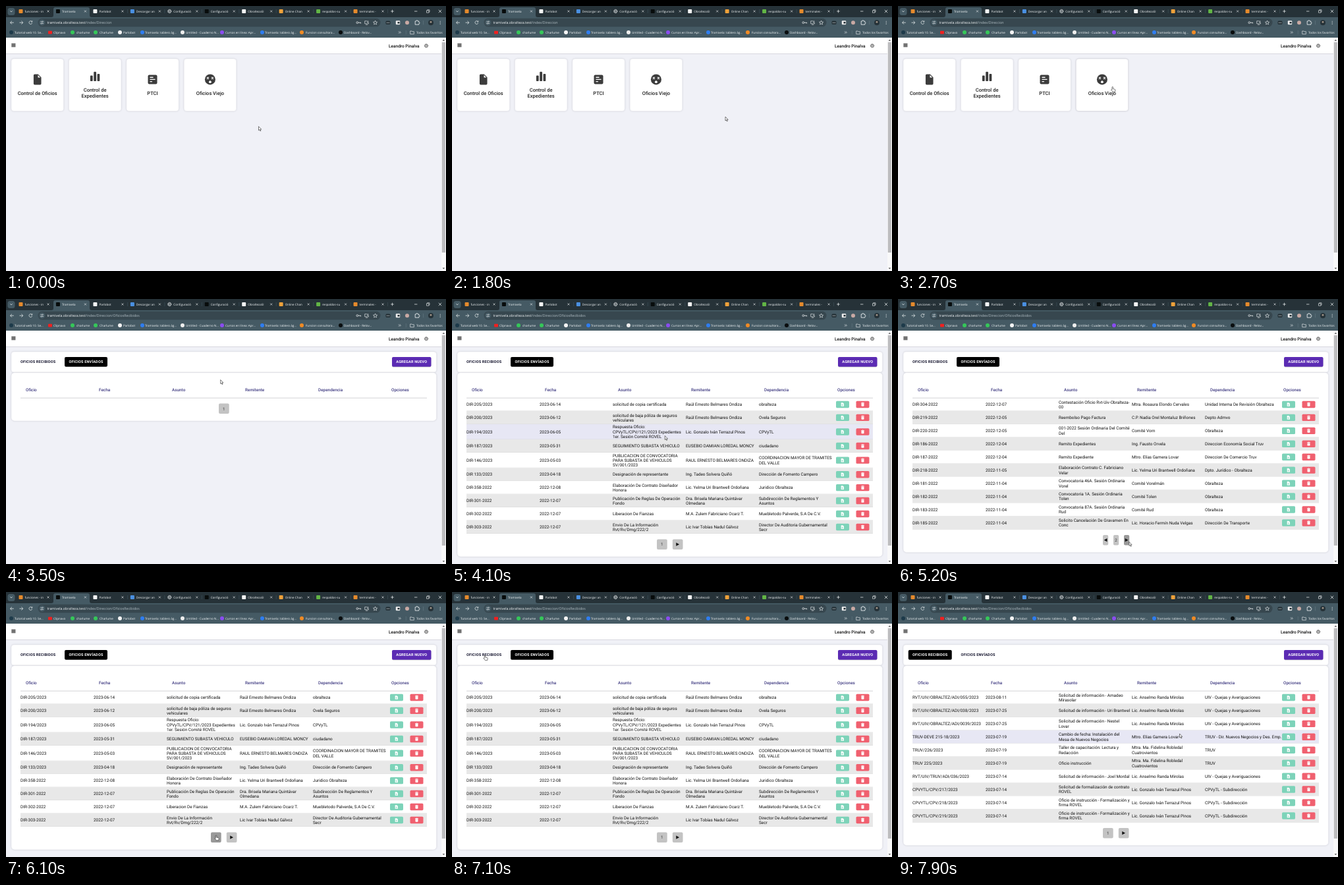
An HTML page that plays this animation: 668x402 px, repeating every 8 s.

```html
<!DOCTYPE html>
<html lang="es">
<head>
<meta charset="utf-8">
<title>Control de oficios</title>
<style>
html, body { margin: 0; width: 100%; height: 100%; overflow: hidden; background: #f0f1f7; }
svg { display: block; width: 668px; height: 402px; text-rendering: geometricPrecision; }
text { font-family: Roboto, sans-serif; white-space: pre; }
#bar text { font-family: "Open Sans", sans-serif; font-weight: 500; }
.card { fill: #fff; stroke: #e2e3ea; stroke-width: .5; filter: drop-shadow(0 .3px .8px #0002); }
.caps { letter-spacing: .16px; }
</style>
</head>
<body>
<svg viewBox="0 0 668 402"><g id="bar"></g><g id="page"></g><g id="view"></g><g id="cursor"></g></svg>
<script>
const $ = id => document.getElementById(id);
const rect = (x, y, w, h, fill, r = 0, more = '') =>
  `<rect x="${x}" y="${y}" width="${w}" height="${h}" rx="${r}" fill="${fill}" ${more}/>`;
const dot = (x, y, r, fill, more = '') => `<circle cx="${x}" cy="${y}" r="${r}" fill="${fill}" ${more}/>`;
const ring = (x, y, r, color, w, more = '') => dot(x, y, r, 'none', `stroke="${color}" stroke-width="${w}" ${more}`);
const shape = (d, fill, more = '') => `<path d="${d}" fill="${fill}" ${more}/>`;
const line = (d, color, w = .7, more = '') =>
  `<path d="${d}" fill="none" stroke="${color}" stroke-width="${w}" ${more}/>`;
// Text centred vertically on y
const text = (x, y, s, size, fill, more = '') =>
  `<text x="${x}" y="${y + size * .355}" font-size="${size}" fill="${fill}" ${more}>${s}</text>`;
const MID = 'text-anchor="middle"', MEDIUM = 'font-weight="500"';
const gear = (x, y, color) => ring(x, y, 2.1, color, .7) +
  ring(x, y, 2.8, color, .7, 'stroke-dasharray="1.1 1.1"') + ring(x, y, .7, color, .5);

// Browser frame
const TABS = [
  ['funciones - in', '#e58a2c'], ['Tramivela', '#080c0c'], ['Parlobot', '#f4f4f4'], ['Descargar an', '#4a90e2'],
  ['Configuració', ''], ['Configuració', '#080c0c'], ['ObraltezaSI', '#f4f4f4'], ['Online Chan', '#efa13a'],
  ['respaldos-su', '#62b545'], ['terminales - ', '#e58a2c']];
const MARKS = [
  [8, 13, 'Tutorial web 10. Se...', '#1d3a4a'], [67, 72, 'Clipnavo', '#f02020'], [101, 107, 'charlume', '#35c759'],
  [136, 142, 'Charlume', '#35c759'], [173, 178, 'Parlobot', '#f4f4f4'], [207, 211, 'Tramivela: tablero ág...', '#2f7df0'],
  [268, 273, 'Untitled - Cuaderno N...', '#eee'], [328, 333, 'Cursos en línea: Apr...', '#8a4cf0'],
  [389, 393, 'Tramivela: tablero ág...', '#2f7df0'], [449, 455, 'Funcion consultora...', '#f08a24'],
  [508, 513, 'Dashboard - Relov...', '#0a0d0e']];

function browser() {
  const ink = '#f6f9fa', bg = '#455a64', dark = '#263238', rule = '#6b7f88';
  let s = rect(0, 0, 668, 18, dark) + rect(0, 17, 668, 31, bg) +
    shape('M69 17q3 0 3-3V5q0-3 3-3h49q3 0 3 3v9q0 3 3 3z', bg) +
    rect(2.5, 3, 11, 11, bg, 3.5) + line('M6.3 7.3l1.7 1.6 1.7-1.6', ink);
  TABS.forEach(([label, color], i) => {
    const x = 22.5 + i * 56.45;
    s += color ? rect(x - 3, 5, 6, 6, color, 1) : gear(x, 8, ink);
    s += text(x + 6, 8, label, 4.55, ink);
    s += line(`M${x + 40} 6.5l3 3m0-3l-3 3`, ink, .6);
    if (i > 1) s += line(`M${x + 49} 5v6`, bg, .5);
  });
  s += line('M586.5 5.7v4.6m-2.3-2.3h4.6', ink) + line('M620 8h4.4M656.8 5.8l4.4 4.4m0-4.4l-4.4 4.4', ink) +
    line('M638.5 6.8h3.4v3.4h-3.4zM639.6 6.8v-1h3.4v3.4h-1', ink, .6);
  s += line('M11.8 25.2H6.5m2.4-2.4l-2.4 2.4 2.4 2.4M20.5 25.2h5.3m-2.4-2.4l2.4 2.4-2.4 2.4', ink) +
    line('M39.3 23.6a2.4 2.4 0 1 0 .4 2.2M39.8 22.3v1.8h-1.9', ink);
  s += rect(48.5, 18.7, 520, 12.8, '#37474f', 6.4) + dot(54.7, 25.1, 4.6, bg) +
    line('M52.3 23.8h2.2m1.8 0h.8M52.3 26.5h.8m1.8 0h2.2', ink, .6) +
    ring(55.4, 23.8, .8, ink, .5) + ring(54, 26.5, .8, ink, .5);
  s += `<text x="62.5" y="27" font-size="5.27" fill="${ink}">tramivela.obralteza.test<tspan id="path" fill="#b4c1c7"></tspan></text>`;
  s += ring(533.3, 25.2, 1.4, ink, .7) + line('M534.7 25.2h4v1.3m-1.4-1.3v1', ink) +
    line('M548 22.8h-3.3v4h5.8v-1.4M546 28.3h3.2M549.3 22v3m-1.3-1l1.3 1.2 1.3-1.2', ink, .6) +
    line('M560.6 22.2l.9 2 2.2.2-1.7 1.5.5 2.1-1.9-1.1-1.9 1.1.5-2.1-1.7-1.5 2.2-.2z', ink, .6);
  s += rect(576.5, 22.5, 7, 5.5, dark, 1.5) + [578.3, 580, 581.7].map(x => dot(x, 25.2, .5, ink)).join('') +
    rect(591.8, 22.2, 6.4, 6, '#eee', 1) + rect(594.5, 24, 3, 2.6, dark) +
    dot(609, 25.2, 3, '#c9a9a4') +
    line('M621.2 23h1.6q0-1.3 1.1-1.3t1.1 1.3h1.8v1.6q1.2 0 1.2 1.1t-1.2 1.1v1.4h-5.6z', ink, .8) +
    line('M633.5 22v6.4', rule, .5) + dot(645, 25.2, 4, dark) + dot(645, 24.3, 1.4, '#a99a8c') +
    [23.2, 25.2, 27.2].map(y => dot(659.2, y, .55, ink)).join('');
  MARKS.forEach(([x, tx, label, color], i) => {
    s += i == 1 ? rect(x - 3, 37.8, 6, 4.6, color, 1) : dot(x, 40.1, 3, color);
    s += text(tx, 40, label, 4.55, ink);
  });
  return s + line('M596 38.4l1.6 1.6-1.6 1.6m1.9-3.2l1.6 1.6-1.6 1.6', ink, .6) + line('M607.3 37v6.2', rule, .5) +
    line('M613.7 38h2.2l.7.8h2.8v3.8h-5.7z', ink, .6) + text(623, 40, 'Todos los favoritos', 4.55, ink);
}

const pageFrame = () =>
  rect(0, 48, 668, 354, '#f0f1f7') + rect(0, 48, 661, 24, '#fff') + rect(0, 72, 661, .7, '#cfcfd4') +
  rect(661, 48, 7, 354, '#f8f8f9') + rect(661.8, 55, 5.2, 319, '#bcbcbe') +
  shape('M662.6 53l1.8-2.2 1.8 2.2zM662.6 397l1.8 2.2 1.8-2.2z', '#666') +
  rect(8.4, 56.8, 6, 5.4, '#8c8c8c') + line('M8.4 57.3h6m-6 2.2h6m-6 2.2h6', '#4a4a4a', .8) +
  text(581, 60.3, 'Leandro Pinalva', 6.5, '#111', MEDIUM) + gear(638, 60.3, '#333');

// Home cards
const DARK = '#3c3c3c';
const CARDS = [
  [['Control de Oficios'], () => shape('M-5.8-6.4q0-1.6 1.6-1.6h5.2l4.8 4.8v9.6q0 1.6-1.6 1.6h-8.4q-1.6 0-1.6-1.6z', DARK) + shape('M.8-6.7v3.7h3.7z', '#fff')],
  [['Control de', 'Expedientes'], () => rect(-7.2, -1.5, 3.8, 8.5, DARK, 1) + rect(-1.9, -7.2, 3.8, 14.2, DARK, 1) + rect(3.4, -4, 3.8, 11, DARK, 1)],
  [['PTCI'], () => rect(-7, -7, 14, 14, DARK, 2) + line('M-4-3.2h5M-4 0h8M-4 3.2h3.4', '#fff', 1.4)],
  [['Oficios Viejo'], () => dot(0, 0, 8, DARK) + dot(0, 3.8, 1.9, '#fff') +
    line('M-5-3.6l3 3m0-3l-3 3M2-3.6l3 3m0-3l-3 3', '#fff', 1.2)]];

function home(hover) {
  return CARDS.map(([lines, icon], i) => {
    const x = 8 + i * 87.4, two = lines.length > 1;
    return rect(x, 80, 79.5, 79.5, '#fff', 4, `class="card"${hover && i == 3 ? ' style="stroke:#c8c9d4"' : ''}`) +
      `<g transform="translate(${x + 39.7} ${two ? 107 : 111.4})">${icon()}</g>` +
      lines.map((l, k) => text(x + 39.7, (two ? 127.4 : 132) + k * 8.8, l, 7.5, '#222', MID + ' ' + MEDIUM)).join('');
  }).join('');
}

// Table rows: cells split by |, lines by ~
const parse = s => s.trim().split('\n').map(r => r.split('|').map(c => c.split('~')));
const SENT = parse(`
DIR-205/2023|2023-06-14|solicitud de copia certificada|Raúl Ernesto Belmares Ondiza|obralteza
DIR-200/2023|2023-06-12|solicitud de baja póliza de seguros~vehiculares|Raúl Ernesto Belmares Ondiza|Ovela Seguros
DIR-194/2023|2023-06-05|Respuesta Oficio:~CPVyTL/CPV/121/2023 Expedientes~1er. Sesión Comité ROVEL|Lic. Gonzalo Iván Terrazul Pinos|CPVyTL
DIR-187/2023|2023-05-31|SEGUIMIENTO SUBASTA VEHICULO|EUSEBIO DAMIAN LOREDAL MONCY|ciudadano
DIR-146/2023|2023-05-03|PUBLICACION DE CONVOCATORIA~PARA SUBASTA DE VEHICULOS~SV/001/2023|RAUL ERNESTO BELMARES ONDIZA|COORDINACION MAYOR DE TRAMITES~DEL VALLE
DIR 133/2023|2023-04-18|Designación de representante|Ing. Tadeo Solvera Quiñó|Dirección de Fomento Campero
DIR-358-2022|2022-12-08|Elaboración De Contrato Diseñador~Honora|Lic. Yelma Uri Brantwell Ordoñana|Juridico Obralteza
DIR-301-2022|2022-12-07|Publicación De Reglas De Operación~Fondo|Dra. Brisela Mariana Quintávar~Olmedana|Subdirección De Reglamentos Y~Asuntos
DIR-302-2022|2022-12-07|Liberacion De Fianzas|M.A. Zulem Fabriciano Ocarz T.|Muebletodo Palverde, S.A De C.V.
DIR-303-2022|2022-12-07|Envio De La Información~Rvt/Rv/Dmg/222/2|Lic Ivar Tobías Nadul Gálvoz|Director De Auditoria Gubernamental~Secr`);
const OLDER = parse(`
DIR-304-2022|2022-12-07|Contestación Oficio Rvt-Uiv-Obralteza-~00|Mtra. Rosaura Elondo Cervales|Unidad Interna De Revisión Obralteza
DIR-219-2022|2022-12-05|Reembolso Pago Factura|C.P. Nadia Orel Montaluz Briñones|Depto Admvo
DIR-220-2022|2022-12-05|001-2022 Sesión Ordinaria Del Comité~Del|Comité Vorn|Obralteza
DIR-186-2022|2022-12-04|Remito Expedientes|Ing. Fausto Orvela|Direccion Economía Social Truv
DIR-187-2022|2022-12-04|Remito Expediente|Mtro. Elías Gamera Lovar|Direccion De Comercio Truv
DIR-218-2022|2022-11-05|Elaboración Contrato C. Fabriciano~Velar|Lic. Yelma Uri Brantwell Ordoñana|Dpto. Jurídico - Obralteza
DIR-181-2022|2022-11-04|Convocatoria 46A. Sesión Ordinaria~Vorel|Comité Vorelmán|Obralteza
DIR-182-2022|2022-11-04|Convocatoria 1A. Sesión Ordinaria~Tolen|Comité Tolen|Obralteza
DIR-183-2022|2022-11-04|Convocatoria 87A. Sesión Ordinaria~Rud|Comité Rud|Obralteza
DIR-185-2022|2022-11-04|Solicito Cancelación De Gravamen En~Conc|Lic. Horacio Fermín Nuda Velgas|Dirección De Transporte`);
const RECEIVED = parse(`
RVT/UIV/OBRALTEZ/ADI/055/2023|2023-08-11|Solicitud de información - Amadeo~Mirasolar|Lic. Anselmo Randa Mirolas|UIV - Quejas y Averiguaciones
RVT/UIV/OBRALTEZ/ADI/038/2023|2023-07-25|Solicitud de información - Uri Brantwel|Lic. Anselmo Randa Mirolas|UIV - Quejas y Averiguaciones
RVT/UIV/OBRALTEZ/ADI/0039/2023|2023-07-25|Solicitud de información - Nestel~Lovar|Lic. Anselmo Randa Mirolas|UIV - Quejas y Averiguaciones
TRUV-DEVE 215-18/2023|2023-07-19|Cambio de fecha: Instalación del~Mesa de Nuevos Negocios|Mtro. Elías Gamera Lovar|TRUV - Dir. Nuevos Negocios y Des. Emp.
TRUV/226/2023|2023-07-19|Taller de capacitación: Lectura y~Redacción|Mtra. Ma. Fidelina Robledal~Cuatrovientos|TRUV
TRUV 225/2023|2023-07-19|Oficio instrucción|Mtra. Ma. Fidelina Robledal~Cuatrovientos|TRUV
RVT/UIV/TRUV/ADI/036/2023|2023-07-14|Solicitud de información - Joel Mordal|Lic. Anselmo Randa Mirolas|UIV - Quejas y Averiguaciones
CPVYTL/CPV/217/2023|2023-07-14|Solicitud de formalización de contrato~ROVEL|Lic. Gonzalo Iván Terrazul Pinos|CPVyTL - Subdirección
CPVYTL/CPV/218/2023|2023-07-14|Oficio de instrucción - Formalización y~firma ROVEL|Lic. Gonzalo Iván Terrazul Pinos|CPVyTL - Subdirección
CPVYTL/CPV/219/2023|2023-07-14|Oficio de instrucción - Formalización y~firma ROVEL|Lic. Gonzalo Iván Terrazul Pinos|CPVyTL - Subdirección`);
const HEADS = ['Oficio', 'Fecha', 'Asunto', 'Remitente', 'Dependencia', 'Opciones'];

const capsButton = (x, w, label, bg, fg) => rect(x, 88, w, 14.7, bg, 2) +
  text(x + w / 2, 95.2, label, 5.57, fg, `${MID} class="caps" font-weight="600"`);

function rowButtons(y) {
  return rect(583, y - 5.2, 20, 10.4, '#7dd3b9', 1.6) + rect(613.5, y - 5.2, 20, 10.4, '#f0606f', 1.6) +
    shape(`M590.7 ${y - 2.8}h2.6l1.7 1.7v3.9h-4.3z`, '#fff') + line(`M592.8 ${y - .5}v2.6m-1.3-1.3h2.6`, '#7dd3b9', .6) +
    shape(`M621.1 ${y - 2.6}h1.4l.4-.5h1.2l.4.5h1.4v.8h-4.8zM621.5 ${y - 1.4}h4v3.5q0 .7-.7.7h-2.6q-.7 0-.7-.7z`, '#fff');
}

function pager(page, y, rows, pos) {
  const wide = page == 1;
  const items = !rows.length ? [[323, '1']] : wide ? [[311, '1'], [334.8, '▶']] : [[311, '◀'], [327, '2'], [343, '▶']];
  const w = wide ? 15.7 : 8.2;
  return items.map(([x, label]) => {
    const over = pos.x >= x && pos.x <= x + w && pos.y >= y && pos.y <= y + 15.5;
    const c = x + w / 2, m = y + 7.7, k = label == '▶' ? 1 : -1;
    return rect(x, y, w, 15.5, over ? '#999' : '#c3c3c3', 2) + (label > '9'
      ? shape(`M${c - 2.4 * k} ${m - 2.6}l${4.8 * k} 2.6 ${-4.8 * k} 2.6z`, '#111')
      : text(c, m, label, 6.2, '#333', MID));
  }).join('');
}

function office({ rows, page, received }, pos, lag) {
  let y = 150, body = '';
  rows.forEach((cells, i) => {
    const h = Math.max(...cells.map(c => c.length)) > 2 ? 23.2 : 19.94, mid = y + h / 2;
    const over = lag.y >= y && lag.y < y + h && lag.x > 22 && lag.x < 639;
    body += rect(22, y, 617, h, over ? '#e7e7f4' : i % 2 ? '#e8e8e8' : '#fff') + rect(22, y + h - .4, 617, .4, '#d2d2d2');
    cells.forEach((lines, c) => lines.forEach((l, k) => {
      body += text(22 + c * 111, mid + (k - (lines.length - 1) / 2) * 7.3, l, 6.39, '#111');
    }));
    body += rowButtons(mid);
    y += h;
  });
  const tab = on => on ? ['#000', '#fff'] : ['#fff', '#15152e'];
  return rect(8, 80, 645.5, 31.3, '#fff', 4, 'class="card"') + rect(8, 111.7, 645.5, y - 76.7, '#fff', 5, 'class="card"') +
    capsButton(15.7, 66, 'OFICIOS RECIBIDOS', ...tab(received)) + capsButton(89, 65, 'OFICIOS ENVÍADOS', ...tab(!received)) +
    rect(586, 88.6, 59.5, 15, '#0003', 2) + capsButton(586, 59.5, 'AGREGAR NUEVO', '#5b2bb3', '#fff') +
    HEADS.map((h, i) => text(30 + i * 111, 138.2, h, 6.39, '#403c82', MEDIUM)).join('') +
    body + rect(22, 149.8, 617, .6, '#b4b4b8') + pager(page, y + 8.6, rows, pos);
}

// Pointer path: time, x, y
const MOVES = [
  [0, 383.5, 182.7], [1000, 383.5, 182.7], [1100, 382.7, 183], [1200, 382.7, 183], [1400, 406, 163], [1500, 415, 168],
  [1800, 415, 168], [1900, 412, 176], [2100, 386, 206], [2300, 346, 152], [2500, 325.7, 122.6], [3700, 325.7, 122.6],
  [4000, 324, 180], [4400, 321, 290], [4600, 319, 348], [4700, 331, 364], [4800, 342, 369], [5000, 345, 369],
  [5200, 350.9, 368.4], [5400, 346, 369], [5700, 318.6, 369], [6400, 319.3, 369.3], [6800, 130, 190],
  [7000, 50, 96], [7200, 50, 96], [7500, 200, 145], [7800, 427.5, 215], [8000, 427.5, 215]];

function pointer(t) {
  const i = Math.max(1, MOVES.findIndex(m => m[0] >= t));
  const [t0, x0, y0] = MOVES[i - 1], [t1, x1, y1] = MOVES[i];
  const k = (t - t0) / (t1 - t0);
  return { x: x0 + (x1 - x0) * k, y: y0 + (y1 - y0) * k };
}

const EDGE = 'stroke="#222" stroke-width=".6" stroke-linejoin="round"';
const POINTERS = {
  arrow: shape('M0 0v6l1.4-1.2 1 2.2 1-.5-1-2.1h1.8z', '#fff', EDGE),
  hand: shape('M-.8.8q0-.9.8-.9t.8.9v2.3l2.6.6q.9.3.8 1.3l-.5 2.6H.3l-2.4-3q.3-.9 1.3-.2z', '#fff', EDGE),
  beam: line('M-1.3-3h2.6M0-3v6M-1.3 3h2.6', '#222', .7)
};
const within = (t, ...spans) => spans.some(([a, b]) => t >= a && t < b);

function draw(t) {
  const pos = pointer(t), lag = pointer(Math.max(0, t - 60)), atHome = t < 3500;
  const state = t < 3700 ? { rows: [], page: 1 }
    : within(t, [4900, 6000]) ? { rows: OLDER, page: 2 }
    : t < 7200 ? { rows: SENT, page: 1 } : { rows: RECEIVED, page: 1, received: true };
  $('path').textContent = '/Index/Direccion' + (atHome ? '' : '/OficiosRecibidos');
  $('view').innerHTML = atHome ? home(t >= 2400) : office(state, pos, lag);
  const kind = within(t, [2400, 3500], [4800, 5100], [5700, 6500], [7000, 7300]) ? 'hand'
    : within(t, [4500, 4700]) ? 'beam' : 'arrow';
  $('cursor').innerHTML = `<g transform="translate(${pos.x} ${pos.y})">${POINTERS[kind]}</g>`;
}

$('bar').innerHTML = browser();
$('page').innerHTML = pageFrame();
let last = -1;
function tick() {
  const t = Math.floor(performance.now() % 8000 / 100) * 100;
  if (t !== last) draw(last = t);
  requestAnimationFrame(tick);
}
tick();
</script>
</body>
</html>
```
